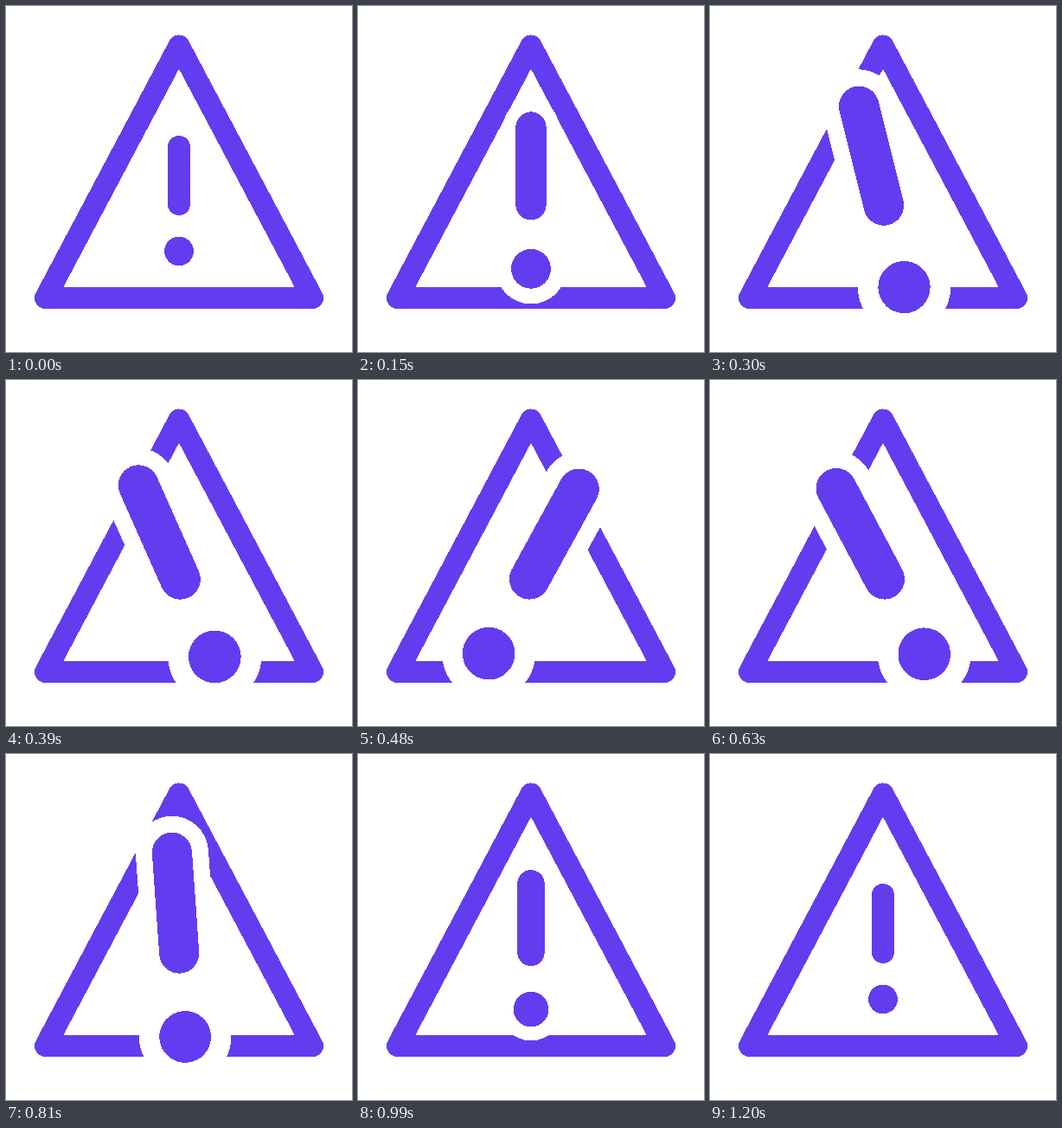
An HTML page for the animation above (1.23 s loop, 400x400 px).

```html
<!DOCTYPE html>
<html lang="en">
<head>
<meta charset="utf-8">
<title>Warning</title>
<style>
  html, body { margin: 0; width: 100%; height: 100%; overflow: hidden; background: #fff; }
  svg { display: block; width: 100vw; height: 100vh; shape-rendering: crispEdges; }
  .ink { stroke: #643cf0; }
  .gap { stroke: #fff; }
  path { fill: none; stroke-linecap: round; stroke-linejoin: round; }
</style>
</head>
<body>
<svg viewBox="0 0 400 400">
  <path class="ink" stroke-width="25" d="M200 46L354.5 337.5H45.5Z"/>
  <g id="mark">
    <path class="gap" stroke-width="47.5" d="M0-64V2"/>
    <path class="gap" stroke-width="60" d="M0 56.5h.01"/>
    <path class="ink" stroke-width="26" d="M0-64V2"/>
    <path class="ink" stroke-width="33.7" d="M0 56.5h.01"/>
  </g>
</svg>
<script>
const LOOP = 1230, STEP = 30;
const mark = document.getElementById('mark');

// [time in ms, value], eased in and out between neighbours
const scaleKeys = [[0, 1], [322, 1.8], [775, 1.8], [1097, 1]];
const swing = 125.4;
const angleKeys = [0, -30, 30, -30, 30, -30, 0].map((a, i) => [240 + i * swing, a]);

function valueAt(keys, t) {
  if (t <= keys[0][0]) return keys[0][1];
  for (let i = 1; i < keys.length; i++) {
    const [t0, a] = keys[i - 1], [t1, b] = keys[i];
    if (t < t1) {
      const x = (t - t0) / (t1 - t0);
      return a + (b - a) * x * x * (3 - 2 * x);
    }
  }
  return keys[keys.length - 1][1];
}

function draw(ms) {
  const t = Math.floor((ms % LOOP) / STEP) * STEP;
  const scale = valueAt(scaleKeys, t), angle = valueAt(angleKeys, t);
  mark.setAttribute('transform', `translate(200 227) rotate(${angle}) scale(${scale})`);
}

const start = performance.now();
function tick() {
  draw(Math.max(0, performance.now() - start));
  requestAnimationFrame(tick);
}
tick();
</script>
</body>
</html>
```
